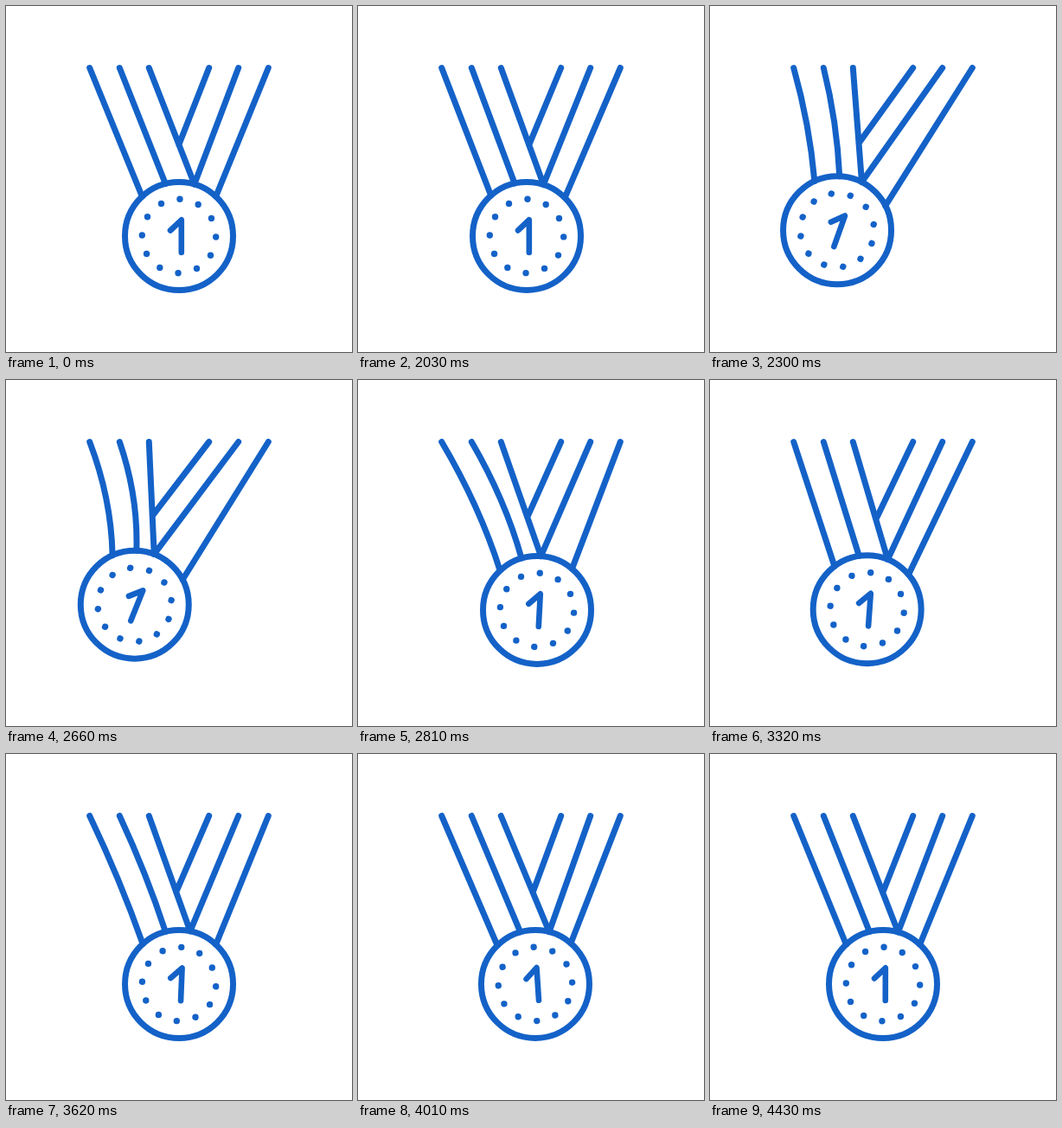
An HTML page for the animation above (5.12 s loop, 400 by 400 pixels).

```html
<!DOCTYPE html>
<html lang="en">
<head>
<meta charset="utf-8">
<title>Swinging medal</title>
<style>
  html, body { margin: 0; height: 100%; overflow: hidden; background: #fff; }
  svg { display: block; width: 100vw; height: 100vh; }
</style>
</head>
<body>
<svg viewBox="0 0 400 400" fill="none" stroke="#1462c8" stroke-width="7" stroke-linecap="round" stroke-linejoin="round">
  <path id="ribbons"/>
  <g id="medal">
    <circle r="62.5"/>
    <g id="face">
      <path d="M-10 -6.5L2.8 -18.7V19" stroke-width="6.6"/>
      <g id="dots" fill="#1462c8" stroke="none"></g>
    </g>
  </g>
</svg>
<script>
const LOOP = 5120, STEP = 30, OFFSET = 20, LAG = 30;
const PIVOT_Y = 56, LENGTH = 210, RADIUS = 62.5, DOT_RING = 42.7;
const RAD = Math.PI / 180;

// Turning points of the swing: time (ms), sideways shift (px)
const turns = [[2000, 0], [2570, -59], [2978, 62], [3386, -26], [3794, 24], [4150, -9], [4430, 0]];

const push = s => 1 - (1 - s ** 1.3) ** 4;
const swing = s => (1 - Math.cos(Math.PI * s ** 1.2)) / 2;

const $ = id => document.getElementById(id);

function shiftAt(t) {
  const next = turns.findIndex(([time]) => t < time);
  if (next < 1) return 0;
  const [t0, x0] = turns[next - 1], [t1, x1] = turns[next];
  const ease = next === 1 ? push : swing;
  return x0 + (x1 - x0) * ease((t - t0) / (t1 - t0));
}

function ribbon(x, end, bend = 0) {
  const start = [x, 71.5];
  const mid = [(x + end[0]) / 2 + 2 * bend, (start[1] + end[1]) / 2];
  return `M${start}Q${mid} ${end}`;
}

function draw(t) {
  const shift = shiftAt(t), late = shiftAt(t - LAG);
  // The left straps sag while the medal hangs left or moves right
  const bend = Math.max(0, 0.38 * (shift - late) - 0.08 * shift);
  const cx = 200 + shift;
  const cy = PIVOT_Y + Math.sqrt(LENGTH ** 2 - shift ** 2);
  const rim = (deg, follow = 0.32) => {
    const angle = (deg - shift * follow) * RAD;
    return [cx + RADIUS * Math.sin(angle), cy - RADIUS * Math.cos(angle)];
  };
  const frontX = 165.3, tip = rim(16.5 - 2 * bend);
  const fork = [frontX + (tip[0] - frontX) * 0.66, 71.5 + (tip[1] - 71.5) * 0.66];

  $("ribbons").setAttribute("d",
    ribbon(96.7, rim(-43 + 0.4 * bend), bend) +
    ribbon(131.3, rim(-14.5), bend) +
    ribbon(frontX, tip) +
    ribbon(234.7, fork) +
    ribbon(268.7, tip) +
    ribbon(303.3, rim(43, 0.38)));
  $("medal").setAttribute("transform", `translate(${cx} ${cy})`);
  $("face").setAttribute("transform", `rotate(${-0.39 * late})`);
}

for (let i = 0; i < 12; i++) {
  const angle = (i * 30 + 1.3) * RAD;
  $("dots").innerHTML +=
    `<circle cx="${DOT_RING * Math.sin(angle)}" cy="${-DOT_RING * Math.cos(angle)}" r="3.7"/>`;
}

function tick() {
  const t = performance.now() % LOOP;
  draw(Math.floor((t - OFFSET) / STEP) * STEP + OFFSET);
  requestAnimationFrame(tick);
}
tick();
</script>
</body>
</html>
```
